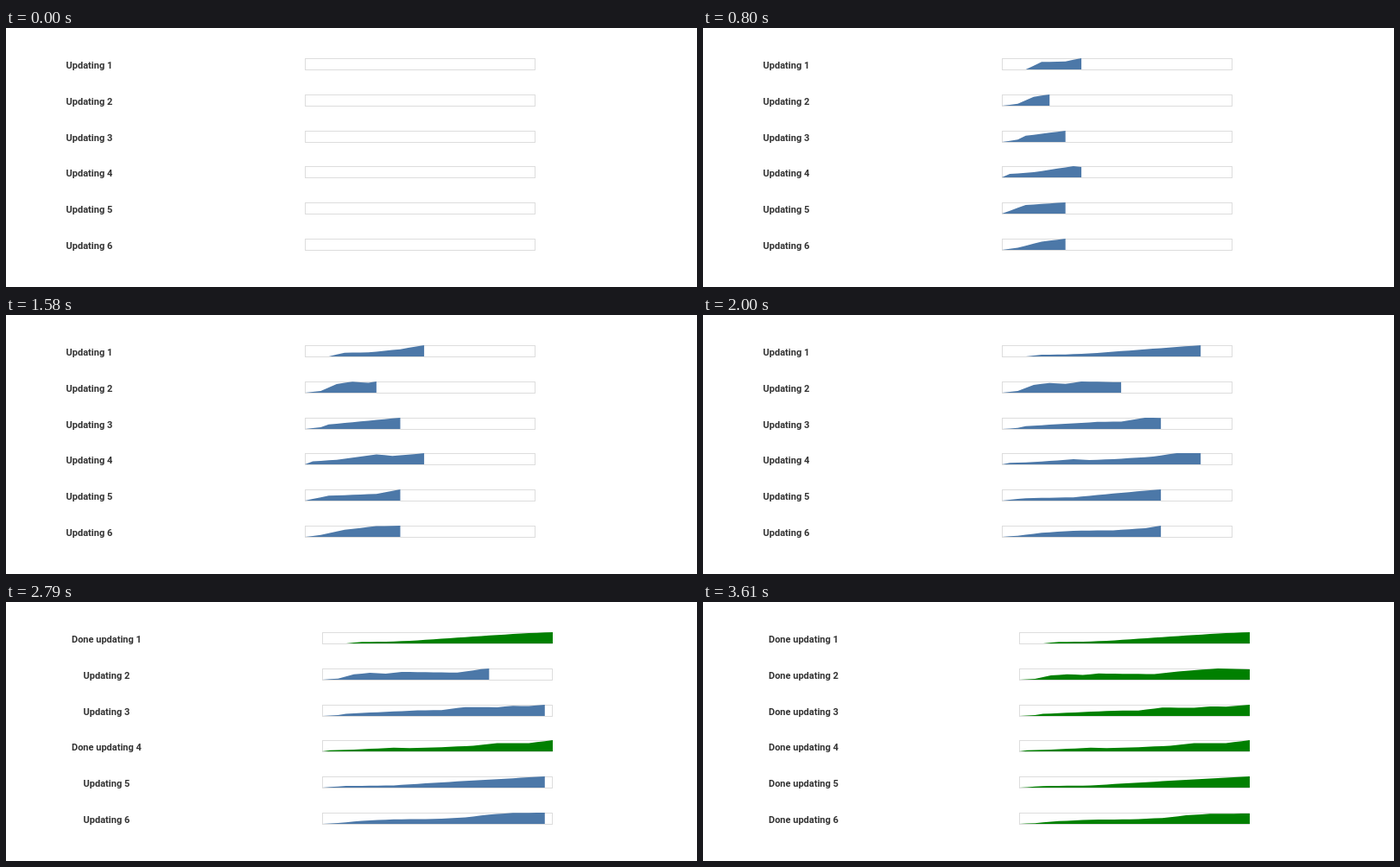
An HTML page with a canvas that plays this animation: 800x300 px, repeating every 3890 ms.

```html
<!DOCTYPE html>
<html lang="en">
<head>
<meta charset="utf-8">
<title>Progress sparklines</title>
<style>
  html, body { margin: 0; width: 800px; height: 300px; overflow: hidden; background: #fff; }
  canvas { display: block; }
</style>
</head>
<body>
<canvas id="stage" width="800" height="300"></canvas>
<script>
const LOOP = 3890, LAST = 29, WIDTH = 267, HEIGHT = 13, TOP = 35, PITCH = 41.75;
// Moments at which the rows advance; the fourth and fifth update arrive together.
const UPDATES = [40, 410, 820, 1600, 1600, 2020, 2410, 2810, 3190, 3590];

// Points gained per update, and the [index, value] bends of each curve after its zero start.
const rows = [
  { speed: 5, bends: [[3, 0], [5, 14], [8, 15], [12, 27], [15, 42], [25, 89], [29, 100]] },
  { speed: 3, bends: [[2, 8], [4, 38], [6, 48], [8, 43], [10, 55], [17, 50], [20, 74], [25, 100], [29, 93]] },
  { speed: 4, bends: [[2, 7], [3, 19], [12, 47], [15, 49], [18, 75], [22, 73], [24, 85], [26, 83], [29, 100]] },
  { speed: 5, bends: [[1, 10], [4, 15], [9, 33], [11, 28], [14, 34], [19, 50], [22, 73], [26, 73], [29, 100]] },
  { speed: 4, bends: [[3, 14], [9, 19], [15, 45], [29, 100]] },
  { speed: 4, bends: [[2, 7], [5, 26], [9, 39], [14, 42], [18, 55], [21, 80], [24, 94], [29, 97], [31, 105]] }
];

// Piecewise linear curve, flat after its last bend.
function valueAt(bends, i) {
  let [x0, y0] = [0, 0];
  for (const [x1, y1] of bends) {
    if (i <= x1) return y0 + (y1 - y0) * (i - x0) / (x1 - x0);
    [x0, y0] = [x1, y1];
  }
  return y0;
}

const ctx = document.getElementById('stage').getContext('2d');
ctx.font = 'bold 11px Roboto, sans-serif';
ctx.textAlign = 'center';

// The vertical scale follows all received values; only the first ones fit the box.
function drawChart(bends, count, x, y, color) {
  ctx.strokeStyle = '#ddd';
  ctx.strokeRect(x + .5, y + .5, WIDTH - 1, HEIGHT);
  if (!count) return;
  const values = Array.from({ length: count + 1 }, (_, i) => valueAt(bends, i));
  const max = Math.max(...values), end = Math.min(count, LAST);
  const px = i => x + i * WIDTH / LAST;
  ctx.beginPath();
  for (let i = 0; i <= end; i++) ctx.lineTo(px(i), y + HEIGHT * (1 - values[i] / max));
  ctx.lineTo(px(end), y + HEIGHT);
  ctx.fillStyle = color;
  ctx.fill();
}

function draw(time) {
  const step = UPDATES.filter(t => t <= time).length;
  const isDone = row => row.speed * step > LAST;
  // The first finished label widens its column and pushes everything right.
  const shift = rows.some(isDone) ? 20 : 0;
  ctx.fillStyle = '#fff';
  ctx.fillRect(0, 0, 800, 300);
  rows.forEach((row, i) => {
    const done = isDone(row), y = TOP + Math.round(i * PITCH);
    drawChart(row.bends, row.speed * step, 346 + shift, y, done ? 'green' : '#4c78a8');
    ctx.fillStyle = '#333';
    ctx.fillText(`${done ? 'Done updating' : 'Updating'} ${i + 1}`, 96.4 + shift, y + 12);
  });
}

const start = performance.now();
function tick() {
  draw((performance.now() - start) % LOOP);
  requestAnimationFrame(tick);
}
tick();
</script>
</body>
</html>
```
